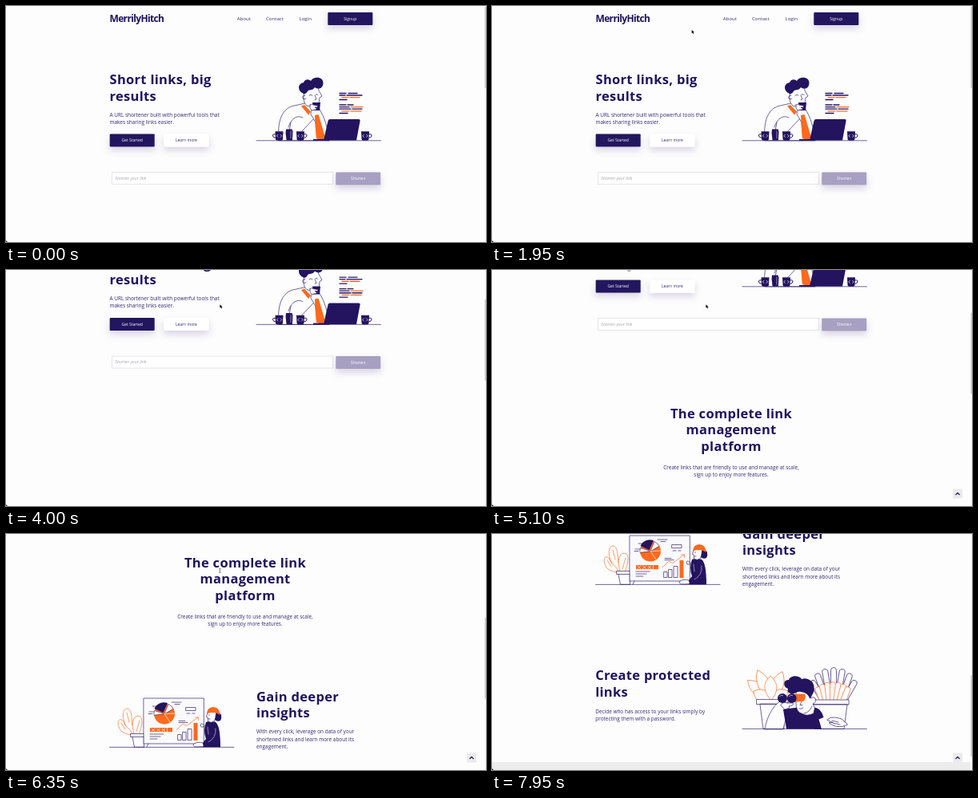
An HTML page for the animation above (8 s loop, 600x296 px).

```html
<!DOCTYPE html>
<html lang="en">
<head>
<meta charset="utf-8">
<title>MerrilyHitch</title>
<style>
  html, body { margin: 0; width: 100%; height: 100%; overflow: hidden; background: #fdfdfe; }
  svg { display: block; width: 100vw; height: 100vh; }
  text { font-family: "Open Sans", "Noto Sans", sans-serif; fill: #352b6d; font-size: 6.45px; }
  .h { font-weight: 700; font-size: 16.5px; letter-spacing: .3px; fill: #1f135d; }
  .logo { font-weight: 700; font-size: 12px; letter-spacing: -.65px; fill: #1f135d; }
  .nav { font-size: 6.1px; }
  .btn { font-size: 5px; text-anchor: middle; }
  .mid { text-anchor: middle; }
  .ph { font-size: 5.2px; font-style: italic; fill: #a5a5ad; }
  .w { fill: #fff; }
  .art { stroke-width: .65; stroke-linecap: round; stroke-linejoin: round; }
  .n { fill: #24135f; stroke: none; }
  .o { fill: #fb6a1e; stroke: none; }
  .nl { fill: none; stroke: #24135f; }
  .ol { fill: none; stroke: #fb6a1e; }
  .p { fill: #fdfdfe; stroke: #24135f; }
</style>
</head>
<body>
<svg viewBox="0 0 600 296" preserveAspectRatio="none">
  <defs>
    <filter id="soft" x="-30%" y="-60%" width="160%" height="300%">
      <feDropShadow dx="0" dy="4.500" stdDeviation="4.500" flood-color="#24135f" flood-opacity=".17"/>
    </filter>
    <g id="mug">
      <path class="nl" d="M9.500 3.500h2.200q1.600 0 1.200 2.200t-3 2.200" stroke-width="1"/>
      <path class="n" d="M0 0h10l-.5 9.500q-.2 2-2 2h-5q-1.800 0-2-2z"/>
      <path d="M3.400 4l-1.600 1.600 1.600 1.600M6.600 4l1.600 1.600-1.600 1.600" fill="none" stroke="#fff" stroke-width=".7"/>
    </g>
  </defs>
  <rect width="600" height="296" fill="#fdfdfe"/>
  <g id="page">
    <g id="hero"></g>

    <g class="art">
      <path class="p" d="M341 168.500C339 146 344 130 358 125.500L374 122 394 134 404 168.500z"/>
      <path class="nl" d="M353 152C356 142 363 136 371 140M352 168L356 146M370 157L386 140"/>
      <path class="p" d="M374 103C371 112 371 121 376 125Q383 128 391 122L392 115 395 113 391 106 390 101z"/>
      <path class="n" d="M372 110C364 107 364 97 372 96C374 91 379 92 381 94C384 88 397 88 396.500 97C396 104 390 105 386 102C383 107 378 104 377 107Q375 111 372 110z"/>
      <path class="nl" d="M379 112q2-1.500 4 0M387 111q2-1 3 .5M386 112l2 5-2 .5M374 112q-4 0-3 4 2 2 4 0"/>
      <path class="o" d="M369 125.500L373 124 381 132.500 378 136.500zM386 137L390.500 136 393 144 399 165 396 168.500 388 166 386.500 148z"/>
      <path class="p" d="M404 168C402 152 398 139 391 128L383 130Q379 135 383 139L388 148"/>
      <path class="o" d="M386 137L390.500 136 393 144 399 165 396 168.500 388 166 386.500 148z"/>
      <path class="n" d="M383 121h10l-1 10h-8z"/>
      <path class="p" d="M380 124q2-2 4 0l5 1q2 1 0 2l-3 0 2 1q1 2-1 2l-5 1q-3-3-2-7z"/>
      <path class="n" d="M405 142h36q2 0 1.600 2L438 168.500H397L402.500 144q.5-2 2.500-2z"/>
      <path class="n" d="M384 167h20v1.800h-20z"/>
      <use href="#mug" transform="matrix(-1 0 0 1 346.500 157.300)"/>
      <path class="n" d="M350 154.500h7.500l1 3-.6 11h-7.300l-1-9z"/>
      <path d="M356 157v9" stroke="#fff" stroke-width=".5"/>
      <use href="#mug" x="363" y="157.300"/>
      <use href="#mug" x="444" y="157.300"/>
      <path class="nl" d="M313 168.800H468.500"/>
      <g id="code"></g>
    </g>

    <g id="lead"></g>

    <g id="gain">
      <g class="art" transform="translate(0 292)">
        <path class="ol" d="M161 253C153 251 145 251 142 244C138 236 141 230 146 234L150 241C144 229 146 219 151 219C157 219 157 229 158 240C158 231 163 226 168 229C172 233 169 244 166 252M150 241q6 4 9 11M158 240l2 12M144 237l5 8M151 224l3 12M167 234l-4 14"/>
        <path class="p" d="M156 250.500h17v4h-17zM158 254.500l2.500 12.800h12v-12.800"/>
        <rect x="172.300" y="206" width="75" height="57" fill="#fafafc" stroke="#24135f"/>
        <path class="nl" d="M178 263l-2 4M241 263l2 4"/>
        <circle class="o" cx="198" cy="225.500" r="13"/>
        <path class="n" d="M196.500 224L185.500 219A13 13 0 0 1 202 212z"/>
        <path d="M198 225.500L203 213.500A13 13 0 0 1 209 219zM198 225.500L185.500 221.500A13 13 0 0 0 185 227z" fill="#fff" stroke="#24135f" stroke-width=".5"/>
        <path d="M198 225.500L211 225M198 225.500L205 236" stroke="#fff"/>
        <path class="nl" d="M183 216h5M179 223h6M178 225.500h5M207 211h12M211 213.500h6M216 234.500h8M216 236.500h11M180 251h17M180 254h13M180 257h9M225 217.500h12v4h-12zM226 225h4M233 225h3"/>
        <path class="o" d="M180 243h28v5.200h-28z"/>
        <path d="M182 244l4 3.500m0-3.500l-4 3.500M188.500 244l4 3.500m0-3.500l-4 3.500M195 244l4 3.500m0-3.500l-4 3.500M201.500 243v5" stroke="#fff"/>
        <path class="p" d="M215 251.500h4v7h-4zM221 248.500h4v10h-4zM227.500 244.500h4.500v14h-4.500z"/>
        <path class="o" d="M234.500 237h5v22h-5z"/>
        <path class="ol" d="M213 246l8-8 5 2.500 14-10.500M236.500 230h4v3.500"/>
        <path class="n" d="M250 236Q256 233 262 236Q268 240 268 267.300H246V262L250 257Q246 246 250 236z"/>
        <path class="n" d="M260 224q7-2 9 3 1 4-1 7-4 2-7-1z"/>
        <path class="p" d="M252 224l-1.500 5.500 1.700.5.500 5q3 2.500 7.500 0l1.500-4 1-7z"/>
        <path class="o" d="M251 225Q252 217 259 217Q267 217 267.500 227L263 224.500Q257 223 251 225z"/>
        <path class="p" d="M247 239q-3-2-4 0l1 3 3 0zM246 262q-8-2-12 2 0 3 5 3l8-.5z"/>
        <path d="M262 244q1 12-9 17M252 242l1 9" fill="none" stroke="#fff" stroke-width=".5"/>
        <path class="nl" d="M253.500 227l1 0M253 232l2 0M129.500 267.400H285"/>
      </g>
    </g>

    <g id="guard">
      <g class="art" transform="translate(0 496)">
        <g id="leaves"></g>
        <path class="p" d="M331 207.500h39v6h-39zM335 213.500l4 31h26v-31z"/>
        <g id="fingers"></g>
        <path class="p" d="M393 208h53v6h-53zM399 214l4 30.500h37l4-30.500z"/>
        <path class="p" d="M341 244.500C344 228 351 216 361 209L371 212 369 225 364 244.500z"/>
        <path class="n" d="M364 220L382 217.500 403 217.500Q412 219 414.500 230L408.500 232.500 412 244.500H368z"/>
        <path class="p" d="M380 195V212Q380 224 388 225.500Q394 229 402 225L403.500 218 401 213Q406 211 404 206Q402 203 399 206L398 195z"/>
        <path class="n" d="M380 199C374 202 368 199 370 194C363 192 364 182 371 183C373 177 384 177 387 182C394 179 403 185 402.500 192C404 198 400 201 397.500 207C396 202 392 199 388 198.500Q384 197 380 199z"/>
        <path class="o" d="M371 201l20-.5q2 4-1 9l-18 2z"/>
        <circle class="n" cx="374.800" cy="206" r="5.900"/>
        <circle class="n" cx="363" cy="206" r="6"/>
        <path d="M359.500 203.500q2-2 4-1M371.500 203.500q2-2 4-1" fill="none" stroke="#fff" stroke-width=".6"/>
        <path class="p" d="M361 214q4-4 8-2l7 0q2 2-1 3l-4 1 1 2-6 2z"/>
        <path class="nl" d="M384 219q3 1 5-1M387 210l-2 4.500 3 0M390 225q7-1 10-9"/>
        <path class="p" d="M419 233q4-4 9-3l6 1q5 1 6 4l4 3q1 2-2 2l-4 1.500q-8 1-13-2l-4-3 5 0zM425 234l8 2M426 237l9 2"/>
        <path class="nl" d="M313 244.400H468.500"/>
      </g>
    </g>
    <rect y="782" width="600" height="60" fill="#ececed"/>
  </g>

  <g id="top">
    <rect x="576" y="274.500" width="12" height="12" rx="1" fill="#ebeaed"/>
    <path d="M579.500 282l2.500-2.500 2.500 2.500" fill="none" stroke="#17143a" stroke-width="1.200"/>
  </g>
  <rect x="598" width="2" height="296" fill="#f8f8f9"/>
  <rect id="thumb" x="598.600" width="1.400" height="102" rx=".7" fill="#c6c6c9"/>
  <path d="M0 293.500q.3 2 2.500 2.500H0z" fill="#111"/>
  <g id="cursor">
    <path id="arrow" d="M0 0v4.300l1-.9.8 1.700.8-.4-.8-1.600h1.400z" fill="#000" stroke="#fff" stroke-width=".35" paint-order="stroke"/>
    <path id="beam" d="M-1 0q1 0 1 .8 0-.8 1-.8M0 .8v3.600M-1 5.200q1 0 1-.8 0 .8 1 .8" fill="none" stroke="#222" stroke-width=".6"/>
  </g>
</svg>
<script>
const LOOP = 8000, NAVY = '#24135f', ORANGE = '#fb6a1e';
const el = id => document.getElementById(id);
const add = (id, html) => el(id).insertAdjacentHTML('beforeend', html);
const text = (cls, x, y, step, ...lines) =>
  lines.map((s, i) => `<text class="${cls}" x="${x}" y="${y + i * step}">${s}</text>`).join('');
const button = (x, y, label, fill, cls = 'w') =>
  `<rect x="${x}" y="${y}" width="56" height="16" rx="1" fill="${fill}" filter="url(#soft)"/>` +
  text('btn ' + cls, x + 28, y + 9.8, 0, label);

add('hero',
  text('logo', 129.5, 20.2, 0, 'MerrilyHitch') +
  text('nav', 288.7, 18, 0, 'About') + text('nav', 325, 18, 0, 'Contact') + text('nav', 366.5, 18, 0, 'Login') +
  button(402.3, 8, 'Signup', NAVY) +
  text('h', 129.5, 98.3, 20.6, 'Short links, big', 'results') +
  text('', 129.5, 138.8, 9, 'A URL shortener built with powerful tools that', 'makes sharing links easier.') +
  button(129.7, 160.5, 'Get Started', NAVY) + button(197.4, 160.5, 'Learn more', '#fff', '') +
  '<rect x="132.700" y="208.500" width="276" height="15" fill="#fff" stroke="#dfdfe4" stroke-width=".8"/>' +
  text('ph', 136.3, 217.8, 0, 'Shorten your link') +
  button(412.2, 208.5, 'Shorten', '#a7a0c2'));

add('lead',
  text('h mid', 299, 333.7, 20.6, 'The complete link', 'management', 'platform') +
  text('mid', 299, 398.2, 9, 'Create links that are friendly to use and manage at scale,', 'sign up to enjoy more features.'));

add('gain',
  text('h', 313, 501.6, 20.6, 'Gain deeper', 'insights') +
  text('', 313, 542.4, 9.1, 'With every click, leverage on data of your', 'shortened links and learn more about its', 'engagement.'));

add('guard',
  text('h', 129.2, 679.2, 20.6, 'Create protected', 'links') +
  text('', 129.2, 720.7, 9, 'Decide who has access to your links simply by', 'protecting them with a password.'));

// Code dashes: y, then start, length and colour of two pieces
[[109.5, 417, 8, 0, 428, 11, 0], [112, 417, 7, 0, 426, 19, 0], [114.7, 420, 8, 1, 430, 12, 1], [117.5, 417, 9, 0, 0, 0, 0],
 [124, 417, 8, 0, 427, 7, 0], [126.6, 417, 12, 0, 431, 15, 1], [129.2, 417, 14, 0, 433, 12, 0],
 [131.8, 420, 9, 1, 431, 13, 1], [134.5, 417, 10, 0, 0, 0, 0]].forEach(([y, ...d]) => {
  for (let i = 0; i < 6; i += 3) if (d[i + 1])
    add('code', `<path d="M${d[i]} ${y}h${d[i + 1]}" stroke="${d[i + 2] ? ORANGE : NAVY}" stroke-width="1.3"/>`);
});

// Pointed leaves fanned around the left pot: angle, length
[[-49, 39], [46, 37], [-24, 42], [21, 39], [-62, 25], [60, 24], [-2, 31]].forEach(([a, h]) =>
  add('leaves', `<path transform="translate(349 209) rotate(${a})" d="M0 0C-10 ${-h * .4} -10 ${-h * .7} 0 ${-h}C10 ${-h * .7} 10 ${-h * .4} 0 0z" fill="#fdfdfe" stroke="${ORANGE}"/>`));

// Rounded fingers: tall outlined row behind, shorter one in front
const finger = (x, a, h, color) =>
  add('fingers', `<path transform="translate(${x} 208) rotate(${a})" d="M-3.500 0V${4 - h}a3.500 3.500 0 0 1 7 0V0" fill="#fdfdfe" stroke="${color}"/>`);
for (let i = -3; i <= 3; i++) finger(427 + i * 4.5, i * 10, 41 - i * i * 1.4, NAVY);
for (let i = -3; i <= 3; i++) finger(426 + i * 4.5, i * 7, 23 - i * i * .6, ORANGE);

const ramp = (t, start, dur) => Math.min(1, Math.max(0, (t - start) / dur));
const outQuart = u => 1 - (1 - u) ** 4;

// CSS "ease": cubic-bezier(.25, .1, .25, 1)
function ease(u) {
  let lo = 0, hi = 1, k;
  for (let i = 0; i < 24; i++) {
    k = (lo + hi) / 2;
    const x = .75 * k * (1 - k) ** 2 + .75 * k * k * (1 - k) + k ** 3;
    if (x < u) lo = k; else hi = k;
  }
  return .3 * k * (1 - k) ** 2 + 3 * k * k * (1 - k) + k ** 3;
}

// Wheel flicks: start, duration, distance
const flicks = [[3828, 700, 148], [5120, 430, 144], [6520, 600, 144.5], [7410, 480, 59.5]];
const scrollAt = t => flicks.reduce((s, [a, d, px]) => s + px * outQuart(ramp(t, a, d)), 0);

function reveal(id, t, start, dx, dy) {
  const p = ease(ramp(t, start, 1000));
  el(id).setAttribute('transform', `translate(${dx * (1 - p)} ${dy * (1 - p)})`);
  el(id).setAttribute('opacity', p);
}

function draw(t) {
  const s = scrollAt(t);
  el('page').setAttribute('transform', `translate(0 ${-s})`);
  reveal('lead', t, 4000, 0, 100);
  reveal('gain', t, 5260, -340, 0);
  reveal('guard', t, 6720, 340, 0);
  el('top').setAttribute('visibility', s > 132 ? 'visible' : 'hidden');
  el('thumb').setAttribute('y', 1 + s * .355);

  const enter = ease(ramp(t, 1300, 450)), move = ease(ramp(t, 3380, 340));
  const x = 249.7 + 17.7 * move, y = -8 + 38 * enter + 13.3 * move;
  const overText = y + s > 316 && y + s < 412;
  el('cursor').setAttribute('transform', `translate(${x} ${y})`);
  el('cursor').setAttribute('visibility', t < 7700 ? 'inherit' : 'hidden');
  el('arrow').setAttribute('display', overText ? 'none' : 'inline');
  el('beam').setAttribute('display', overText ? 'inline' : 'none');
}

const t0 = performance.now();
function tick() {
  draw((performance.now() - t0) % LOOP);
  requestAnimationFrame(tick);
}
draw(0);
requestAnimationFrame(tick);
</script>
</body>
</html>
```
